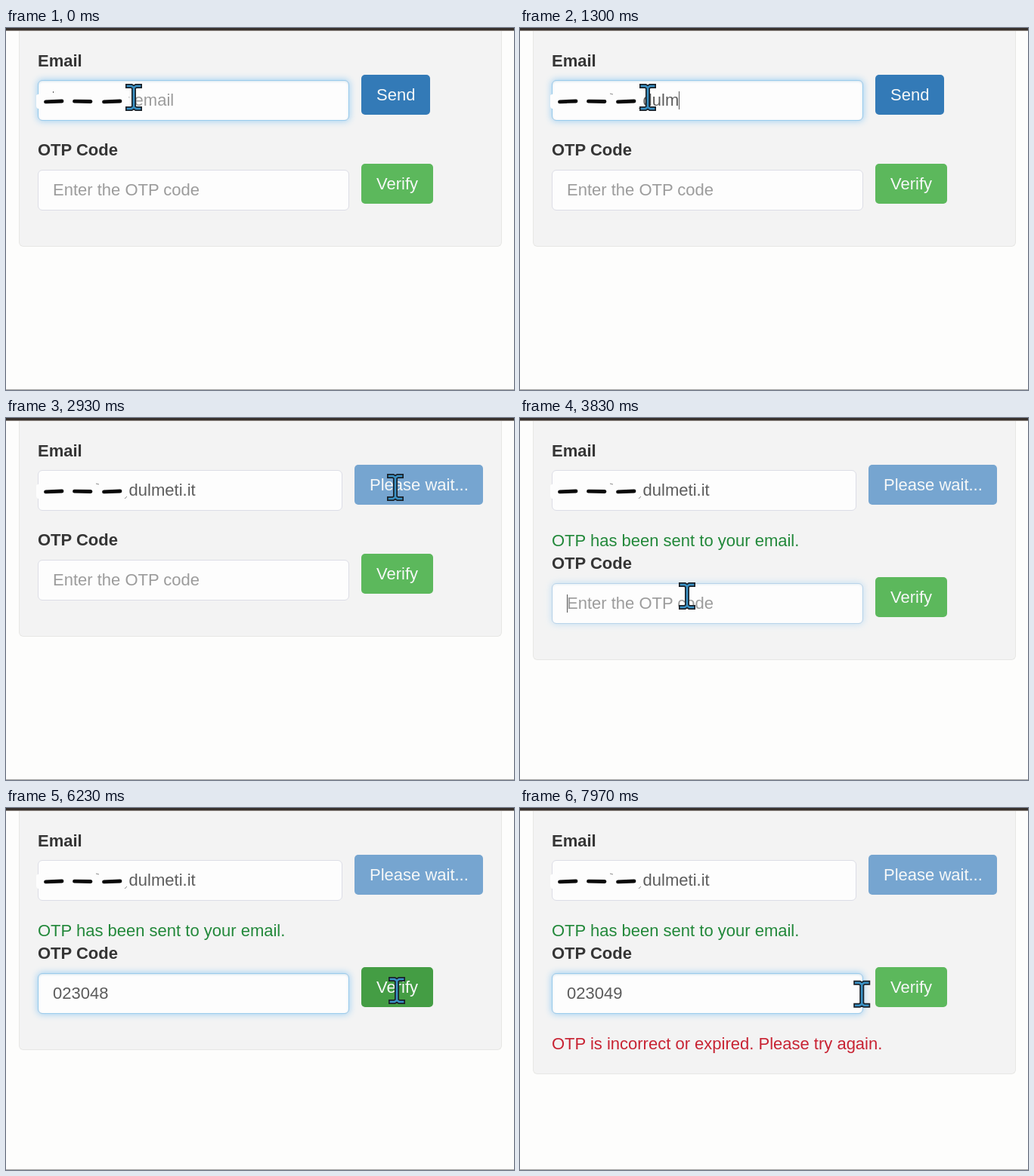
These frames come from a looping animation (672 by 480 pixels, 8000 ms). An HTML page:

```html
<!DOCTYPE html>
<html lang="en">
<head>
<meta charset="utf-8">
<title>OTP form</title>
<style>
  html, body { margin: 0; width: 100%; height: 100%; overflow: hidden; background: #fdfdfc; }
  #stage { position: relative; width: 672px; height: 480px; overflow: hidden;
    font: 22px/32px "Liberation Sans", Arial, sans-serif; color: #353535; }
  #stage * { position: absolute; box-sizing: border-box; white-space: pre; }
  #topbar { width: 672px; height: 4px; background: linear-gradient(#37302c 60%, #b3aca6); }
  #bottomline { top: 479px; width: 672px; height: 1px; background: #a3a3a3; }
  #panel { left: 17px; top: 4px; width: 639px; background: #f3f3f3;
    border: 1px solid #e7e7e5; border-top: 0; border-radius: 0 0 6px 6px; }
  .line { left: 42px; }
  .label { font-weight: bold; }
  #sent { top: 147px; color: #22883a; }
  #error { top: 297px; color: #c82333; }
  .field { left: 42px; width: 412px; height: 54px; padding-left: 19px; line-height: 52px;
    background: #fdfdfd; border: 1px solid #dcdde6; border-radius: 6px; color: #5c5c5c; }
  .field.empty { color: #9c9c9c; }
  .glow { inset: -1px; border: 1.5px solid #9acbec; border-radius: 6px;
    box-shadow: 0 0 9px 1px #a6d3f3, inset 0 1px 3px #d3e4ee; }
  .caret { top: 14px; width: 1px; height: 24px; background: #555; }
  .button { left: 470px; height: 53px; padding-left: 20px; line-height: 53px;
    border-radius: 5px; color: #f6f8f8; }
  #send { top: 62px; }
  #verify { width: 95px; }
  svg { left: 0; top: 0; }
</style>
</head>
<body>
<div id="stage">
  <div id="panel"></div>
  <div id="topbar"></div>
  <div id="bottomline"></div>
  <div class="line label" style="top:28px">Email</div>
  <div id="email" class="field" style="top:69px"><div class="glow"></div><span></span><div class="caret"></div></div>
  <div id="send" class="button"></div>
  <div id="sent" class="line">OTP has been sent to your email.</div>
  <div id="otpLabel" class="line label">OTP Code</div>
  <div id="otp" class="field"><div class="glow"></div><span></span><div class="caret"></div></div>
  <div id="verify" class="button">Verify</div>
  <div id="error" class="line">OTP is incorrect or expired. Please try again.</div>
  <svg width="672" height="480" fill="none">
    <path d="M40 89Q44 86 60 86H162.5V108H50Q40 108 40 104Z" fill="#fdfdfd"/>
    <path d="M52.500 97.800L74 97M90.500 97.200L112 97.500M129.500 97.800L151 97"
      stroke="#080808" stroke-width="4.800" stroke-linecap="round"/>
    <path id="specks" d="M119 87l4 1M160 104l-3 3" stroke="#8b8b8b"/>
    <g id="cursor" stroke-linecap="square">
      <path d="M-8-15H-3L0-13 3-15H8M0-13V13M-8 15H-3L0 13 3 15H8" stroke="#1b2128" stroke-width="6"/>
      <path d="M-8-15H-3L0-13 3-15H8M0-13V13M-8 15H-3L0 13 3 15H8" stroke="#3a92c6" stroke-width="2.600"/>
    </g>
  </svg>
</div>
<script>
const LOOP = 8000, FADE = 150, BLINK = 530;
const ADDRESS = 'anyuser@dulmeti.it';
const SEND_CLICK = 2750, SENT = 3150, VERIFY_CLICK = 6300, FAILED = 6550;

const get = id => document.getElementById(id);
const clamp = v => Math.max(0, Math.min(1, v));
const show = (el, on) => { el.style.visibility = on ? 'visible' : 'hidden'; };

// [time, text]
const emailEdits = [...ADDRESS].map((_, i) => [200 + 100 * i, ADDRESS.slice(0, i + 1)]);
const otpEdits = [[4200, '0'], [4400, '02'], [4600, '023'], [5300, '0230'], [5500, '02304'],
  [5700, '023048'], [7200, '02304'], [7400, '023049']];

// [focus time, blur time]
const emailFocus = [[-1000, SEND_CLICK]];
const otpFocus = [[3750, VERIFY_CLICK], [7020, 9000]];

// [time, x, y]; the last move is still under way when the loop restarts
const cursorPath = [[0, 169, 92], [2200, 169, 92], [2650, 515, 92], [2950, 515, 92],
  [3600, 221, 236], [5850, 221, 236], [6200, 517, 242], [6480, 517, 242],
  [7000, 312, 263], [7600, 312, 263], [8200, 520, 239]];

function cursorAt(t) {
  const i = cursorPath.findIndex(p => p[0] > t);
  const [t0, x0, y0] = cursorPath[i - 1], [t1, x1, y1] = cursorPath[i];
  const u = (t - t0) / (t1 - t0), e = u * u * (3 - 2 * u);
  return [x0 + (x1 - x0) * e, y0 + (y1 - y0) * e];
}

function drawField(id, t, edits, focusSpans, placeholder) {
  const field = get(id), [glow, text, caret] = field.children;
  const edit = edits.filter(e => e[0] <= t).pop();
  const focus = focusSpans.find(([from, to]) => t >= from && t < to);
  text.textContent = edit ? edit[1] : placeholder;
  field.classList.toggle('empty', !edit);
  glow.style.opacity = Math.max(...focusSpans.map(([from, to]) =>
    Math.min(clamp((t - from) / FADE), clamp(1 - (t - to) / FADE))));
  const since = t - Math.max(edit ? edit[0] : 0, focus ? focus[0] : 0);
  show(caret, focus && Math.floor(since / BLINK) % 2 === 0);
  caret.style.left = 19 + (edit ? text.offsetWidth : 0) + 'px';
}

function draw(t) {
  const waiting = t >= SEND_CLICK, sent = t >= SENT, failed = t >= FAILED;
  const shift = sent ? 31 : 0;
  drawField('email', t, emailEdits, emailFocus, 'Enter your email');
  drawField('otp', t, otpEdits, otpFocus, 'Enter the OTP code');

  get('panel').style.height = (failed ? 349 : sent ? 317 : 286) + 'px';
  get('email').style.width = (waiting ? 403 : 412) + 'px';
  get('otpLabel').style.top = 146 + shift + 'px';
  get('otp').style.top = 188 + shift + 'px';
  get('verify').style.top = 180 + shift + 'px';
  show(get('sent'), sent);
  show(get('error'), failed);

  const send = get('send').style;
  get('send').textContent = waiting ? 'Please wait...' : 'Send';
  send.left = (waiting ? 461 : 470) + 'px';
  send.width = (waiting ? 170 : 91) + 'px';
  send.background = waiting ? '#76a5d0' : t > 2580 ? '#286090' : '#337ab7';

  const active = t >= 6130 && t < otpFocus[1][0];
  get('verify').style.background = active ? '#449d44' : '#5cb85c';

  show(get('specks'), t >= emailEdits[7][0]);
  get('cursor').setAttribute('transform', `translate(${cursorAt(t)})`);
}

function tick() {
  draw(performance.now() % LOOP);
  requestAnimationFrame(tick);
}
tick();
</script>
</body>
</html>
```
